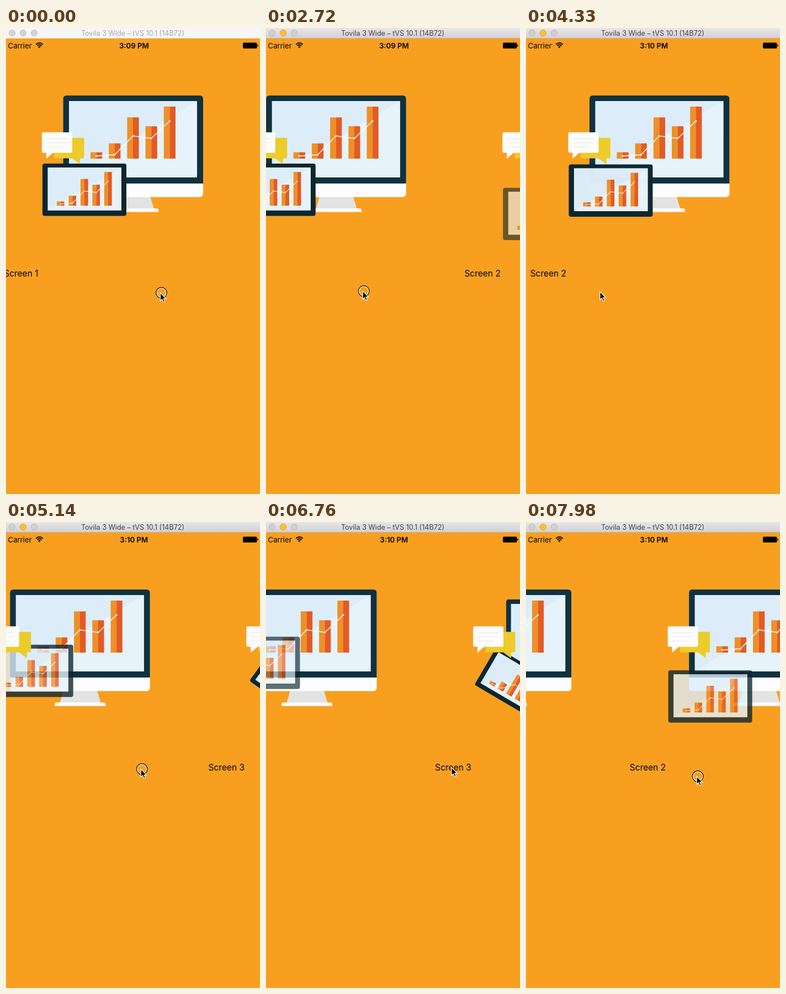
An HTML page that plays this animation: 460x842 px, repeating every 8000 ms.

```html
<!DOCTYPE html>
<html lang="en">
<head>
<meta charset="utf-8">
<title>Paged intro screens</title>
<style>
html, body { margin: 0; width: 100%; height: 100%; overflow: hidden; background: #f89f20; }
svg { display: block; width: 460px; height: 842px; font-family: Inter, Roboto, sans-serif; }
</style>
</head>
<body>
<svg viewBox="0 0 460 842">
  <defs>
    <linearGradient id="bar" x2="0" y2="1">
      <stop stop-color="#e8e6e8"/><stop offset="1" stop-color="#d2d0d2"/>
    </linearGradient>
    <g id="chart"></g>
    <g id="monitor">
      <path d="M200 305H261.5L268 327H194Z" fill="#e3e3e4"/>
      <path d="M184.500 332.500V330Q184.500 326 188.500 326H272.500Q276.500 326 276.500 330V332.500Z" fill="#fdfdfd"/>
      <rect x="103.500" y="122" width="253.500" height="183.500" rx="6" fill="#fdfdfd"/>
      <path d="M103.500 281V128Q103.500 122 109.500 122H351Q357 122 357 128V281Z" fill="#10323f"/>
      <rect x="114" y="132" width="232" height="138" fill="#dcedf9"/>
      <path d="M346 132V270H114Z" fill="#e6f3fb"/>
      <use href="#chart" x="153" y="236"/>
    </g>
    <g id="tablet">
      <rect x="66" y="245" width="152" height="94.500" rx="4" fill="#0d262f"/>
      <rect x="75.500" y="252" width="133.500" height="77.500" fill="#dcedf9"/>
      <path d="M209 252V329.500H75.500Z" fill="#e6f3fb"/>
      <use href="#chart" transform="translate(92 321) scale(.647)"/>
    </g>
    <g id="bubbles">
      <path d="M119 234V235L134 246V234Z" fill="#edcb2b"/>
      <rect x="87" y="198.500" width="54.500" height="37" rx="2" fill="#edcb2b"/>
      <path d="M73 224V236L87 224Z" fill="#fdfdfd"/>
      <rect x="65" y="188.500" width="55" height="37" rx="3" fill="#fdfdfd"/>
      <path d="M73 200H111M73 207.500H111M73 215H103" stroke="#f0f0f0" stroke-width="2"/>
    </g>
  </defs>

  <rect width="460" height="842" fill="#f89f20"/>
  <g id="pages"></g>

  <rect id="titlebar" width="460" height="19"/>
  <path id="edge" d="M0 18.500H460"/>
  <g id="lights" stroke-width="1">
    <circle cx="11" cy="9" r="5.600"/><circle cx="31" cy="9" r="5.600"/><circle cx="51" cy="9" r="5.600"/>
  </g>
  <text id="title" x="229.500" y="14" font-size="12.600" text-anchor="middle">Tovila 3 Wide – tVS 10.1 (14B72)</text>

  <text x="3.500" y="36.500" font-size="13.200">Carrier</text>
  <g fill="none" stroke="#000" stroke-width="1.900">
    <path d="M54.300 29.700Q60.500 24.300 66.700 29.700M56.600 32.300Q60.500 28.900 64.400 32.300"/>
  </g>
  <path d="M58.200 33.900Q60.500 32 62.800 33.900L60.500 36.400Z"/>
  <text id="clock" x="231.800" y="36.500" font-size="13.200" font-weight="600" text-anchor="middle"></text>
  <rect x="429" y="26.500" width="25.500" height="10.500" rx="2"/>
  <path d="M455.300 30Q457 30.300 457 31.700T455.300 33.500Z"/>

  <g id="cursor">
    <g id="touch" fill="none">
      <circle r="9.700" stroke="#111" stroke-width="1.400"/>
      <circle r="8.400" stroke="#fff" stroke-width="1.200"/>
    </g>
    <path d="M-2 0V14.500L1.300 11.500L3.700 17L6.100 16L3.800 10.600H8.300Z" stroke="#fff" stroke-width="1.100"/>
  </g>
</svg>
<script>
const LOOP = 8000, SPACING = 466.5, WIDTH = 460;
const $ = id => document.getElementById(id);

// Chart shared by the monitor and the tablet, origin at its bottom left
$('chart').innerHTML = [11.5, 27.5, 74.5, 58.5, 94].map((h, i) => {
  const x = i * 33.2;
  return `<rect x="${x}" y="${-h}" width="10.700" height="${h}" fill="#ee9028"/>` +
    `<rect x="${x + 10.6}" y="${-h}" width="10.600" height="${h}" fill="#e45a24"/>`;
}).join('');
const trend = [4.8, 7, 41, 36.5, 68].map((h, i) => [10.6 + i * 33.2, -h]);
$('chart').innerHTML +=
  `<polyline points="${trend.join(' ')}" fill="none" stroke="#fffaf2" stroke-width="1.600"/>` +
  trend.map(([x, y]) => `<circle cx="${x}" cy="${y}" r="1.600" fill="#fff"/>`).join('');

const pages = [1, 2, 3].map(n => {
  const g = document.createElementNS('http://www.w3.org/2000/svg', 'g');
  g.innerHTML = `<use href="#monitor"/><use href="#tablet"/><use href="#bubbles"/>
    <text x="-3.800" y="449" font-size="15.500">Screen ${n}</text>`;
  $('pages').append(g);
  const [monitor, tablet] = g.children;
  return { g, monitor, tablet };
});

// Pointer path: time, x, y
const path = [
  [0, 281.5, 478.5], [470, 281.5, 478.5], [740, 333.5, 478.5], [1220, 333.5, 478.5],
  [1600, 379, 479.5], [1930, 294, 481], [2020, 312, 481], [2250, 296.5, 479.5],
  [2400, 296.5, 479.5], [2720, 177.5, 475.5], [2860, 144, 473], [3200, 144, 473],
  [3500, 411.5, 460.5], [3720, 411.5, 460.5], [3860, 283.5, 459.5], [3950, 165, 472],
  [4020, 125, 482], [4250, 125, 482], [4550, 220, 450], [4900, 382, 448],
  [5040, 382, 448], [5140, 247.5, 446.5], [5200, 178, 448], [5290, 160, 450],
  [5870, 160, 450], [6070, 92.5, 449.5], [6230, 92.5, 449.5], [6310, 148.5, 449.5],
  [6640, 338, 443.5], [6850, 338, 443.5], [7450, 85, 452], [7660, 85, 453],
  [7980, 310.5, 459.5], [8000, 322, 460]
];
const touches = [[0, 60], [320, 500], [990, 1090], [2230, 2870], [3490, 3940],
  [4940, 5190], [6060, 6640], [7560, 8000]];
// Swipes: drag start, release, settled, x where the page takes hold, direction, from, to
const swipes = [
  [2400, 2870, 3190, 280.5, 1, 0, 0],
  [3720, 3940, 4420, 369.5, 1, 0, 1],
  [5040, 5190, 5660, 342.5, 1, 1, 2],
  [6230, 6640, 7110, 129.5, -1, 2, 1],
  [7660, 8000, 8400, 119.5, -1, 1, 0]
];

const slope = (i, k) => (path[i + 1][k] - path[i][k]) / (path[i + 1][0] - path[i][0]);

function tangent(i, k) {
  if (i === 0 || i === path.length - 1) return 0;
  const a = slope(i - 1, k), b = slope(i, k);
  return a * b <= 0 ? 0 : 2 * a * b / (a + b);
}

// Monotone cubic through the path points
function pointer(t, k) {
  let i = 0;
  while (i < path.length - 2 && t >= path[i + 1][0]) i++;
  const h = path[i + 1][0] - path[i][0], u = (t - path[i][0]) / h, v = 1 - u;
  return path[i][k] * (1 + 2 * u) * v * v + path[i + 1][k] * u * u * (3 - 2 * u) +
    h * u * v * (tangent(i, k) * v - tangent(i + 1, k) * u);
}

function scrollAt(t) {
  let pos = 0;
  for (const [start, release, end, hold, dir, from, to] of swipes) {
    if (t < start) break;
    const x = pointer(Math.min(t, release), 1);
    pos = from * SPACING + dir * Math.max(0, dir * (hold - x));
    if (t > release) {
      const u = Math.min(1, (t - release) / (end - release));
      pos += (to * SPACING - pos) * Math.sin(u * Math.PI / 2);
    }
  }
  return pos;
}

const around = (x, y, change) => `translate(${x} ${y}) ${change} translate(${-x} ${-y})`;

const effects = [
  ({ tablet }, p) => {
    tablet.setAttribute('transform', `translate(${Math.min(0, p) * 111} 0)`);
  },
  ({ tablet }, p) => {
    tablet.setAttribute('transform', `translate(0 ${p * (p > 0 ? 55.5 : 111)})`);
    tablet.setAttribute('opacity', Math.max(0, p > 0 ? 1 - p / 2 : 1 + p));
  },
  ({ monitor, tablet }, p) => {
    const s = 1 - Math.max(0, p) / 4;
    monitor.setAttribute('transform', around(230.5, 227, `scale(${s})`));
    tablet.setAttribute('transform', around(142, 292, `rotate(${p * 45}) scale(${s})`));
  }
];

function drawWindow(active) {
  $('titlebar').setAttribute('fill', active ? 'url(#bar)' : '#f6f6f6');
  $('edge').setAttribute('stroke', active ? '#bcb8b4' : '#e4e0da');
  $('title').setAttribute('fill', active ? '#454345' : '#a9a9a9');
  [...$('lights').children].forEach((c, i) => {
    const lit = active && i === 1;
    c.setAttribute('fill', lit ? '#fdbf2f' : active ? '#d0ced0' : '#d3d3d3');
    c.setAttribute('stroke', lit ? '#e0a52c' : active ? '#b9b7b9' : '#c6c6c6');
  });
}

function draw(t) {
  const pos = scrollAt(t);
  pages.forEach((page, i) => {
    const x = i * SPACING - pos;
    page.g.setAttribute('transform', `translate(${x} 0)`);
    page.g.setAttribute('visibility', Math.abs(x) < 466 ? 'visible' : 'hidden');
    effects[i](page, x / WIDTH);
  });
  drawWindow(t >= 990);
  $('clock').textContent = t < 4150 ? '3:09 PM' : '3:10 PM';
  $('cursor').setAttribute('transform', `translate(${pointer(t, 1)} ${pointer(t, 2)})`);
  const down = touches.some(([a, b]) => t >= a && t < b);
  $('touch').setAttribute('visibility', down ? 'visible' : 'hidden');
}

const begin = performance.now();
function tick() {
  draw((performance.now() - begin) % LOOP);
  requestAnimationFrame(tick);
}
tick();
</script>
</body>
</html>
```
